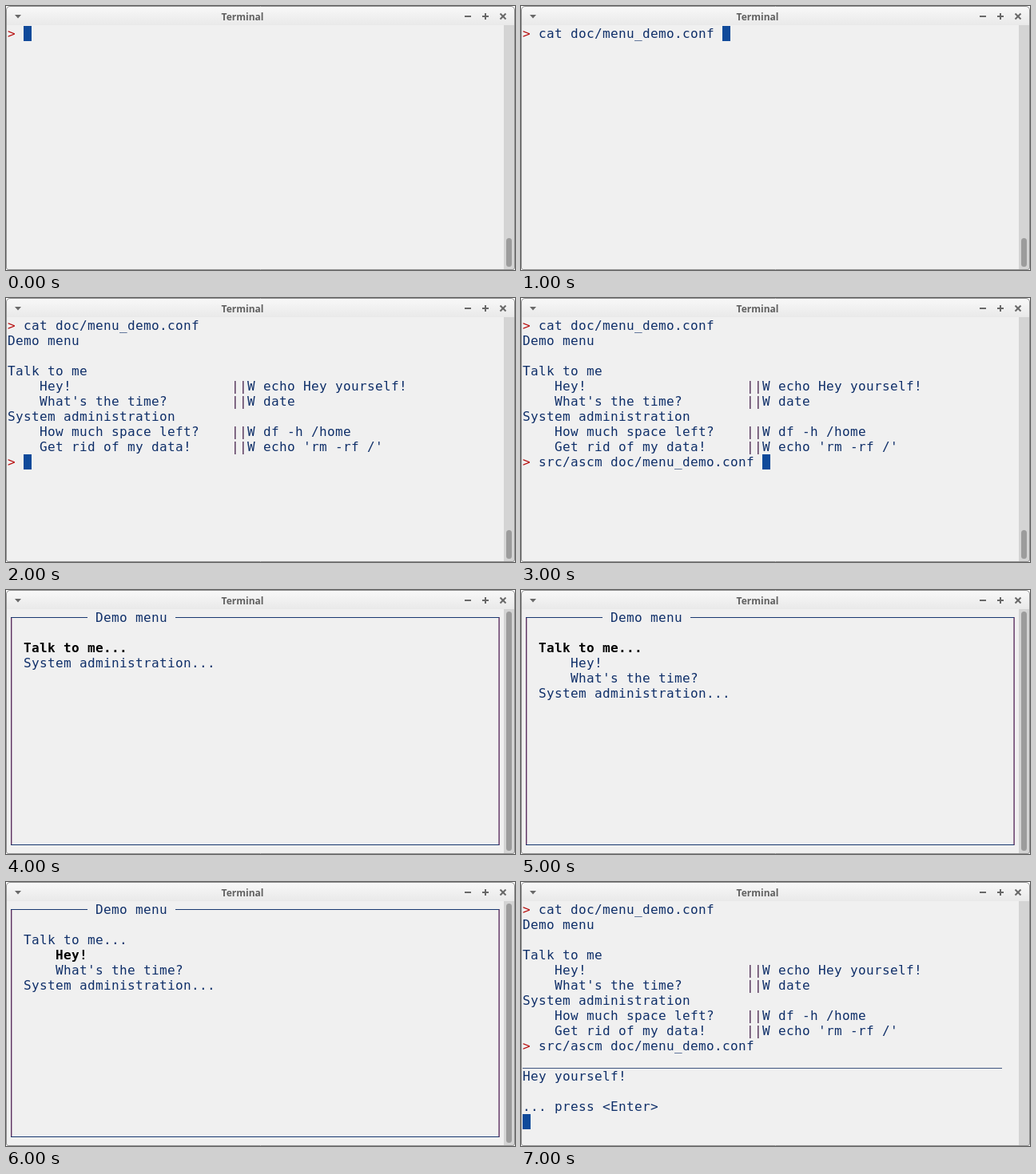
Recreate the animation shown at these times as an HTML page with a canvas. Size 637 by 331 pixels, loop 8 s.

```html
<!DOCTYPE html>
<html lang="en">
<head>
<meta charset="utf-8">
<title>Terminal menu demo</title>
<style>
html, body { margin: 0; width: 100%; height: 100%; overflow: hidden; background: #fff; }
canvas { display: block; }
</style>
</head>
<body>
<canvas id="stage" width="637" height="331"></canvas>
<script>
const ctx = document.getElementById('stage').getContext('2d', { alpha: false });
const W = 637, H = 331, LOOP = 8000, STEP = 1000;
const CELL = 10, ROW = 19, LEFT = 2, TOP = 25;
const MONO = '16px "DejaVu Sans Mono", monospace';
const INK = '#0f2f69', RED = '#b80f0f', PIPE = '#4b2851', CURSOR = '#0f4a9a';
const BACK = '#f0f0f0', BUTTON = '#686868';

const LISTING = [
  '> cat doc/menu_demo.conf',
  'Demo menu',
  '',
  'Talk to me',
  '    Hey!                    ||W echo Hey yourself!',
  "    What's the time?        ||W date",
  'System administration',
  '    How much space left?    ||W df -h /home',
  "    Get rid of my data!     ||W echo 'rm -rf /'"
];
const RUN = '> src/ascm doc/menu_demo.conf';
const TALK = 'Talk to me...', SYSTEM = 'System administration...';
const OPEN_MENU = [TALK, '    Hey!', "    What's the time?", SYSTEM];

function rect(x, y, w, h, color) {
  ctx.fillStyle = color;
  ctx.fillRect(x, y, w, h);
}

function line(points, color, width) {
  ctx.strokeStyle = color;
  ctx.lineWidth = width;
  ctx.beginPath();
  points.forEach(([x, y], i) => i ? ctx.lineTo(x, y) : ctx.moveTo(x, y));
  ctx.stroke();
}

// Every character sits on the terminal's cell grid.
function text(str, col, row, color = INK, bold = false) {
  ctx.font = (bold ? 'bold ' : '') + MONO;
  ctx.textAlign = 'left';
  [...str].forEach((ch, i) => {
    ctx.fillStyle = ch === '|' ? PIPE : color;
    ctx.fillText(ch, LEFT + (col + i) * CELL, TOP + row * ROW + 15);
  });
}

function cursor(col, row) {
  rect(LEFT + col * CELL, TOP + row * ROW, CELL, ROW, CURSOR);
}

function shell(lines) {
  lines.forEach((str, row) => {
    const prompt = str.startsWith('>');
    if (prompt) text('>', 0, row, RED);
    text(prompt ? ' ' + str.slice(1).trimStart() : str, prompt ? 1 : 0, row);
  });
}

function frameWindow() {
  rect(0, 0, W, H, '#fff');
  ctx.beginPath();
  ctx.roundRect(0, 0, W, H, [5, 5, 3, 3]);
  ctx.fillStyle = BACK;
  ctx.fill();

  ctx.save();
  ctx.clip();
  const bar = ctx.createLinearGradient(0, 1, 0, 24);
  bar.addColorStop(0, '#f8f8f8');
  bar.addColorStop(1, '#e9e9e9');
  rect(0, 0, W, 24, bar);
  rect(623, 24, 13, 306, '#d4d4d4');
  ctx.restore();

  ctx.beginPath();
  ctx.roundRect(0.5, 0.5, W - 1, H - 1, [4.5, 4.5, 2.5, 2.5]);
  ctx.strokeStyle = '#909090';
  ctx.lineWidth = 1;
  ctx.stroke();

  ctx.fillStyle = '#606060';
  ctx.font = 'bold 12px "Open Sans", "Noto Sans", sans-serif';
  ctx.textAlign = 'center';
  ctx.fillText('Terminal', 296, 18);

  ctx.fillStyle = BUTTON;
  ctx.beginPath();
  ctx.moveTo(11, 11);
  ctx.lineTo(19, 11);
  ctx.lineTo(15, 15.5);
  ctx.fill();
  rect(574, 12, 8, 2, BUTTON);
  rect(596, 12, 8, 2, BUTTON);
  rect(599, 9, 2, 8, BUTTON);
  line([[618.5, 9.5], [625.5, 16.5]], BUTTON, 2);
  line([[618.5, 16.5], [625.5, 9.5]], BUTTON, 2);
}

function thumb(top) {
  ctx.fillStyle = '#9c9c9c';
  ctx.beginPath();
  ctx.roundRect(626, top, 7, 327 - top, 3.5);
  ctx.fill();
}

function menu(items, chosen) {
  thumb(27);
  rect(6, 34, 1.4, 286, '#5c3061');
  rect(616.4, 34, 1.4, 286, '#5c3061');
  rect(6, 34, 96, 1, '#17376f');
  rect(212, 34, 405, 1, '#17376f');
  rect(6, 319, 611, 1, '#17376f');
  text('Demo menu', 11, 0);
  items.forEach((str, i) => {
    const on = i === chosen;
    text(str, 2, 2 + i, on ? '#000' : INK, on);
  });
}

function prompt(lines, col) {
  thumb(291);
  shell(lines);
  cursor(col, lines.length - 1);
}

function output() {
  shell([...LISTING, RUN, '', 'Hey yourself!', '', '... press <Enter>']);
  rect(LEFT, 233, 60 * CELL, 1, '#40557f');
  cursor(0, 14);
}

const scenes = [
  () => prompt(['> '], 2),
  () => prompt([LISTING[0]], 25),
  () => prompt([...LISTING, '> '], 2),
  () => prompt([...LISTING, RUN], 30),
  () => menu([TALK, SYSTEM], 0),
  () => menu(OPEN_MENU, 0),
  () => menu(OPEN_MENU, 1),
  output
];

const start = performance.now();

function draw() {
  const t = (performance.now() - start) % LOOP;
  frameWindow();
  scenes[Math.floor(t / STEP)]();
  requestAnimationFrame(draw);
}
draw();
</script>
</body>
</html>
```
